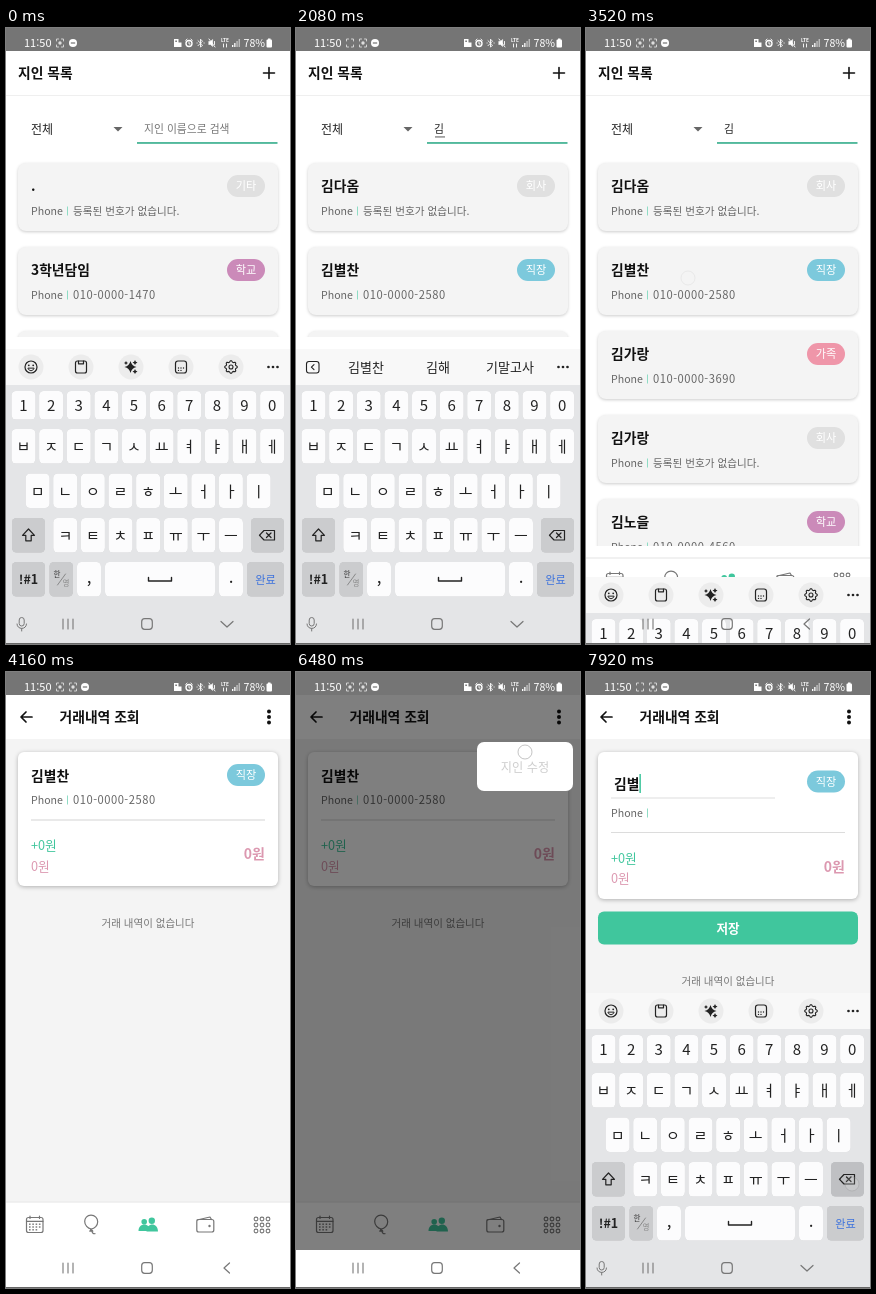
Write an HTML page that moves like this. It is 284 by 616 pixels and loops after 8 s.

```html
<!DOCTYPE html>
<html lang="ko">
<head>
<meta charset="utf-8">
<title>지인 목록</title>
<style>
  html, body { margin: 0; width: 100%; height: 100%; overflow: hidden; background: #fff; }
  svg { display: block; width: 100vw; height: 100vh; }
  text { font-family: "Noto Sans CJK KR", "Noto Sans", sans-serif; white-space: pre; }
  .card { filter: drop-shadow(0 1.5px 1.5px rgba(0, 0, 0, .2)); }
  .sheet { filter: drop-shadow(0 1px 2px rgba(0, 0, 0, .28)); }
  .key { filter: drop-shadow(0 .8px .3px rgba(0, 0, 0, .16)); }
</style>
</head>
<body>
<svg id="stage" viewBox="0 0 284 616" xmlns="http://www.w3.org/2000/svg"></svg>
<script>
const LOOP = 8000, STEP = 80, KB_HEIGHT = 295;
const GREEN = '#40c69d', PINK = '#dc98b0', GREY = '#e0e0e0';
const BLUE = '#7cc9dc', MAUVE = '#cb8ab9', ROSE = '#ef96a9';
const NO_PHONE = '등록된 번호가 없습니다.';
const FRIEND = { name: '김별찬', phone: '010-0000-2580', tag: '직장', color: BLUE };

const ALL = [
  { name: '.', phone: NO_PHONE, tag: '기타', color: GREY },
  { name: '3학년담임', phone: '010-0000-1470', tag: '학교', color: MAUVE },
  { name: '', phone: '', tag: '', color: '#f4f4f4' },
];
const FOUND = [
  { name: '김다옴', phone: NO_PHONE, tag: '회사', color: GREY },
  FRIEND,
  { name: '김가랑', phone: '010-0000-3690', tag: '가족', color: ROSE },
  { name: '김가랑', phone: NO_PHONE, tag: '회사', color: GREY },
  { name: '김노을', phone: '010-0000-4560', tag: '학교', color: MAUVE },
];

// Drawing helpers; text is placed by its vertical centre.
const group = (id, body, extra = '') => `<g id="${id}" ${extra}>${body}</g>`;
const rect = (x, y, w, h, fill, r = 0, extra = '') =>
  `<rect x="${x}" y="${y}" width="${w}" height="${h}" rx="${r}" fill="${fill}" ${extra}/>`;
const dot = (x, y, r, fill, extra = '') => `<circle cx="${x}" cy="${y}" r="${r}" fill="${fill}" ${extra}/>`;
const line = (d, color, w = 1.2, fill = 'none') =>
  `<path d="${d}" stroke="${color}" stroke-width="${w}" fill="${fill}" stroke-linecap="round" stroke-linejoin="round"/>`;
const label = (x, y, str, size, fill, extra = '') =>
  `<text x="${x}" y="${(y + size * .37).toFixed(2)}" font-size="${size}" fill="${fill}" ${extra}>${str}</text>`;
const MID = 'text-anchor="middle"', BOLD = 'font-weight="700"';

const chip = (y, tag, color) =>
  rect(221, y - 11, 38, 22, color, 11) + label(240, y, tag, 11.2, '#fff', MID);

function phoneRow(y, phone) {
  const number = phone.startsWith('0');
  return label(25, y, 'Phone', 10.6, '#666') + rect(61, y - 4.5, 1, 9, '#8fdcc5') +
    label(67, y, phone, number ? 11.2 : 10.6, '#666', number ? 'letter-spacing=".5"' : '');
}

function listCard(p, i) {
  const y = 135 + 84 * i;
  return rect(12, y, 260, 68, '#f4f4f4', 8, 'class="card"') +
    (p.name && label(25, y + 23, p.name, 13.8, '#111', BOLD) + chip(y + 23, p.tag, p.color) +
      phoneRow(y + 48, p.phone));
}

function statusBar() {
  const w = '#fff';
  const bracket = x => line(`M${x - 3.5} 13v-2h2M${x + 3.5} 13v-2h-2M${x - 3.5} 17v2h2M${x + 3.5} 17v2h-2`, '#ddd', .9);
  return rect(0, 0, 284, 23, '#757575') + label(18, 15, '11:50', 11, w) +
    bracket(54) + dot(54, 15, 1.7, '#ddd', 'id="blink"') +
    group('second', bracket(67) + dot(67, 15, 1.7, '#ddd')) +
    group('mute', dot(79, 15, 4, w) + rect(76.8, 14.4, 4.4, 1.2, '#757575')) +
    rect(168, 11, 4.5, 8, w) + rect(172, 14.5, 3.5, 4.5, w) + rect(169.3, 12.5, 1.6, 1.5, '#757575') +
    dot(183, 15.5, 3, 'none', 'stroke="#fff" stroke-width="1.4"') +
    line('M183 14v2h1.2M179.7 12.3l1.4-1.2M186.3 12.3l-1.4-1.2', w, .9) +
    line('M192 12.7l4.5 4.5-2 2v-8l2 2-4.5 4.5M191 15h.2M198 15h.2', w, .9) +
    line('M203 13.5h1.6l2-2v7l-2-2h-1.6z', w, .6, w) + line('M203 11l6 8M208.5 13.5v3', w, .9) +
    label(219, 12.6, 'LTE', 4.8, w, `${MID} ${BOLD}`) + line('M217.5 16v3M220.5 16v3', w, .9) +
    [0, 1, 2, 3].map(i => rect(226 + 2.2 * i, 17 - 2 * i, 1.3, 2 + 2 * i, i < 2 ? w : '#c4c4c4')).join('') +
    label(237.5, 15, '78%', 10.6, w) + rect(260.5, 11.5, 5.5, 8, w, 1) + rect(262, 10.5, 2.5, 2, w);
}

function tabBar() {
  const c = '#777';
  let s = rect(0, 529.5, 284, 49, '#fff') + rect(0, 529.5, 284, 1, '#e3e3e3');
  s += rect(20.5, 545.5, 16.5, 15, 'none', 2, `stroke="${c}" stroke-width="1.2"`) +
    line('M20.5 549.3h16.5M24 544v2.5M33.5 544v2.5', c);
  for (let i = 0; i < 11; i++) s += rect(23 + i % 4 * 3.3, 551.5 + Math.floor(i / 4) * 2.8, 1.6, 1.4, c);
  s += line('M85 543.2c-4 0-6.3 3-6.3 6.4c0 3.5 3 7 6.5 7.4c3.5-.4 6.5-3.6 6.5-7.3c0-3.5-2.7-6.5-6.7-6.5M85 557l-1.2 2.2h3zM86 559c0 2 1.5 3 3 2.7', c);
  s += dot(138.2, 549.7, 2.8, GREEN) + dot(145.8, 548.8, 3.2, GREEN) +
    `<path d="M132.5 559c0-8 10-8 10.5-3l-2 3zM140.5 559.5c0-9.5 11.5-9.5 11.5 0z" fill="${GREEN}"/>`;
  s += rect(190.8, 547.5, 17, 12.5, 'none', 2, `stroke="${c}" stroke-width="1.2"`) +
    line('M191 548l13-3 1.5 2.5', c) + dot(203.5, 554, 1.2, c);
  for (let i = 0; i < 9; i++)
    s += dot(250 + i % 3 * 6, 547 + Math.floor(i / 3) * 6, 1.9, 'none', `stroke="${c}" stroke-width="1.1"`);
  return s;
}

function keyboard() {
  const ink = '#222', dark = '#cbccce';
  const cap = (x, y, w, h, fill = '#fcfcfd', id = '') => rect(x, y, w, h, fill, 4.5, `class="key" ${id}`);
  const row = (keys, x0, y, h, size) => [...keys].map((k, i) => {
    const x = x0 + 27.62 * i;
    return cap((x - 12).toFixed(1), y, 24, h) + label(x.toFixed(1), y + h / 2 + .5, k, size, ink, MID);
  }).join('');
  let tools = [25, 75, 125, 175, 225].map(x => dot(x, 339, 12.5, '#ececec')).join('');
  tools += dot(25, 339, 6, 'none', `stroke="${ink}" stroke-width="1.2"`) + dot(22.8, 337.3, .9, ink) +
    dot(27.2, 337.3, .9, ink) + line('M22 340.5c1 3 5 3 6 0z', ink, 1);
  tools += rect(69.5, 333, 11, 12, 'none', 2, `stroke="${ink}" stroke-width="1.2"`) + line('M72.5 333v2.8h5v-2.8', ink);
  const star = (x, y, r) => `<path d="M${x} ${y - r}q${r * .2} ${r * .8} ${r} ${r}q${-r * .8} ${r * .2} ${-r} ${r}q${-r * .2} ${-r * .8} ${-r} ${-r}q${r * .8} ${-r * .2} ${r} ${-r}" fill="${ink}"/>`;
  tools += star(124.5, 339, 6) + star(129, 334.5, 2.5) + star(129, 343.5, 2.5) + star(120, 335, 2);
  tools += rect(169.5, 333, 11, 12, 'none', 2.5, `stroke="${ink}" stroke-width="1.2"`) +
    [[172.5, 340], [175, 340], [177.5, 340], [172.5, 342.4], [175, 342.4]].map(([x, y]) => dot(x, y, .7, ink)).join('');
  let gear = '';
  for (let i = 0; i < 32; i++) {
    const a = (i - .5) * Math.PI / 16, r = i % 4 < 2 ? 6.2 : 5;
    gear += (i ? 'L' : 'M') + (225 + r * Math.cos(a)).toFixed(1) + ' ' + (339 + r * Math.sin(a)).toFixed(1);
  }
  tools += line(gear + 'z', ink, 1.1) + dot(225, 339, 2, 'none', `stroke="${ink}" stroke-width="1.1"`);
  const hints = rect(10.5, 333.5, 12.5, 11.5, 'none', 2.5, `stroke="${ink}" stroke-width="1.1"`) +
    line('M18 336.7l-2.6 2.5 2.6 2.5', ink, 1.1) +
    [70, 142, 214].map((x, i) => label(x, 339.5, '', 13, ink, `${MID} id="hint${i}"`)).join('');

  return rect(0, 321, 284, 36, '#f8f8f8') + rect(0, 357, 284, 259, '#e4e5e7') +
    group('tools', tools) + group('hints', hints) + [262.5, 267, 271.5].map(x => dot(x, 339, 1.35, ink)).join('') +
    row('1234567890', 17.5, 363, 28.5, 15) + row('ㅂㅈㄷㄱㅅㅛㅕㅑㅐㅔ', 17.5, 401, 34.5, 15) +
    row('ㅁㄴㅇㄹㅎㅗㅓㅏㅣ', 31.6, 445.5, 34.5, 15) + row('ㅋㅌㅊㅍㅠㅜㅡ', 59.3, 490, 34.5, 15) +
    cap(6, 490, 33, 34.5, dark) + line('M22.5 501l-6 6.3h3.3v5.5h5.4v-5.5h3.3z', ink) +
    cap(245, 490, 33, 34.5, dark, 'id="erase"') +
    line('M258 502.5h10.5v9.5h-10.5l-4.5-4.75zM260.5 505l4.5 4.5M265 505l-4.5 4.5', ink) +
    cap(6, 534, 33, 34.5, dark) + label(22.5, 551.5, '!#1', 12.5, ink, `${MID} ${BOLD}`) +
    cap(43.5, 534, 23.5, 34.5, dark) + label(51, 546.5, '한', 7.5, '#333', MID) +
    label(60, 555.5, '영', 7.5, '#888', MID) + line('M51.5 557l8-11', '#777', .8) +
    cap(71, 534, 24, 34.5) + label(83, 549, ',', 17, ink, MID) +
    cap(99, 534, 110, 34.5) + line('M142.5 549.5v3.5h23v-3.5', ink, 1.4) +
    cap(213, 534, 24, 34.5) + label(225, 549, '.', 17, ink, MID) +
    cap(241, 534, 37, 34.5, dark) + label(259.5, 551.5, '완료', 11.2, '#3d72dc', MID);
}

function systemNav() {
  const c = '#777';
  return line('M57 591v10M62 591v10M67 591v10', c, 1.1) +
    rect(135.7, 590.7, 10.6, 10.6, 'none', 3, `stroke="${c}" stroke-width="1.2"`) +
    group('back', line('M223.5 591l-5.5 5 5.5 5', c)) +
    group('down', line('M215 593.5l6 5.5 6-5.5', c) + rect(13.2, 589.5, 5, 8.5, 'none', 2.5, `stroke="${c}"`) +
      line('M11 596c0 6 9.5 6 9.5 0M15.7 600.5v2.5', c, 1));
}

const listPage = rect(0, 23, 284, 555, '#fff') + rect(0, 67, 284, 1, '#efefef') +
  label(12, 45, '지인 목록', 13.8, '#111', BOLD) + line('M257.5 45h11M263 39.5v11', '#111', 1.6) +
  label(25, 101.6, '전체', 12, '#222') + `<path d="M107.5 99h9l-4.5 4.6z" fill="#666"/>` +
  label(138, 101, '', 10.8, '#777', 'id="query"') + rect(139, 108.5, 10, .9, '#444', 0, 'id="compose"') +
  rect(131, 114, 140.5, 1.9, '#52b99c') +
  `<g clip-path="url(#view)">${group('all', ALL.map(listCard).join(''))}${group('found', FOUND.map(listCard).join(''))}</g>`;

const detailPage = rect(0, 23, 284, 507, '#f4f4f4', 0, 'id="ground"') + rect(0, 23, 284, 44, '#fff') +
  line('M26 45H15.5M20 40l-5 5 5 5', '#111', 1.7) + label(53.5, 45, '거래내역 조회', 13.8, '#111', BOLD) +
  group('more', [39.5, 45, 50.5].map(y => dot(263, y, 2, '#111')).join('')) +
  rect(12, 80, 260, 134, '#fff', 6, 'class="sheet" id="sheet"') +
  group('profile', label(25, 104, FRIEND.name, 13.8, '#111', BOLD) + chip(103, FRIEND.tag, FRIEND.color) +
    phoneRow(128, FRIEND.phone) + rect(25, 147, 234, 2, '#e9e9e9')) +
  group('edit', label(28, 112, FRIEND.name, 13.8, '#111', `${BOLD} id="field"`) +
    rect(66, 102, 1.5, 19, GREEN, 0, 'id="caret"') + rect(25, 125.5, 164, 1, '#ddd') +
    chip(109.5, FRIEND.tag, FRIEND.color) + phoneRow(141, '') + rect(25, 160, 234, 1, '#dcdcdc') +
    rect(12, 239.5, 260, 33, GREEN, 6) + label(142, 256, '저장', 12.6, '#fff', `${MID} ${BOLD}`)) +
  group('sums', label(25, 173.5, '+0원', 12.7, GREEN) + label(25, 194, '0원', 12.7, PINK) +
    label(259, 182, '0원', 14, PINK, `text-anchor="end" ${BOLD}`)) +
  group('empty', label(142, 251, '거래 내역이 없습니다', 10.5, '#777', MID));

document.getElementById('stage').innerHTML =
  `<clipPath id="view"><rect id="window" x="0" y="125" width="284" height="184"/></clipPath>` +
  rect(0, 0, 284, 616, '#fff') + group('list', listPage) + group('detail', detailPage) + group('tabs', tabBar()) +
  group('menu', rect(0, 23, 284, 555, 'rgba(0,0,0,.5)') + rect(181, 70, 96, 49, '#fff', 7) +
    label(229, 95, '지인 수정', 12.2, '#222', `${MID} id="item"`)) +
  group('keys', keyboard()) + systemNav() + statusBar() + rect(0, 615, 284, 1, '#666') +
  dot(0, 0, 7, 'rgba(255,255,255,.25)', 'id="tap" stroke="#888" stroke-opacity=".55" stroke-width="1"');

const ui = {};
document.querySelectorAll('[id]').forEach(el => ui[el.id] = el);

// Timelines
const KB = [[0, 0], [3200, 0], [3280, 35], [3360, 95], [3440, 168], [3520, 228], [3600, 272], [3680, KB_HEIGHT],
  [7200, KB_HEIGHT], [7280, 250], [7360, 168], [7440, 92], [7520, 34], [7600, 6], [7680, 0], [LOOP, 0]];
const QUERY = [[0, '지인 이름으로 검색'], [1120, 'ㄱ'], [1440, '기'], [1760, '김']];
const HINTS = [[0, ['기말고사', '김해', FRIEND.name]], [1920, [FRIEND.name, '김해', '기말고사']]];
const TAPS = [[100, 420, 1040, 1200], [252, 465, 1360, 1520], [32, 465, 1680, 1840], [102, 250, 3040, 3200],
  [102, 250, 3440, 3600], [261, 38, 5440, 5600], [229, 80, 6320, 6560], [100, 112, 6960, 7120], [266, 512, 7760, LOOP]];

const ramp = (t, a, b) => Math.min(1, Math.max(0, (t - a) / (b - a)));
const within = (t, a, b) => t >= a && t < b;
const latest = (table, t) => table.filter(([at]) => at <= t).pop()[1];
const show = (el, on) => el.style.display = on ? '' : 'none';
const shift = (el, y) => el.setAttribute('transform', `translate(0 ${y})`);

function between(table, t) {
  const i = table.findIndex(([at]) => at > t);
  const [a, from] = table[i - 1], [b, to] = table[i];
  return from + (to - from) * (t - a) / (b - a);
}

function render(t) {
  const typed = within(t, 1120, 3200), editing = t >= 6560;
  const keysOpen = t < 3200 || t >= 7200;

  show(ui.blink, !within(t, 1840, 2320) && !within(t, 5840, 6080) && t < 7600);
  show(ui.second, t >= 80);
  ui.mute.setAttribute('transform', `translate(${t < 80 ? -12 : 0} 0)`);

  ui.query.textContent = latest(QUERY, t);
  ui.query.setAttribute('fill', t < 1120 ? '#777' : '#222');
  show(ui.compose, within(t, 1120, 3040));
  show(ui.all, t < 1920);
  show(ui.found, t >= 1920);
  ui.found.style.opacity = ramp(t, 1840, 2000);
  ui.window.setAttribute('height', keysOpen ? 184 : 393);

  const enter = 1 - (1 - ramp(t, 3680, 4160)) ** 2;
  show(ui.detail, enter > 0);
  ui.detail.style.opacity = enter;
  show(ui.list, enter < 1);
  ui.more.style.opacity = within(t, 5440, 5680) ? .3 : 1;
  show(ui.profile, !editing);
  show(ui.edit, editing);
  ui.sheet.setAttribute('height', editing ? 147 : 134);
  shift(ui.sums, editing ? 12.5 : 0);
  shift(ui.empty, editing ? 58 : 0);
  ui.ground.setAttribute('height', t >= 7200 ? 298 : 507);
  ui.field.textContent = t < 7840 ? FRIEND.name : FRIEND.name.slice(0, 2);
  ui.caret.setAttribute('x', t < 7840 ? 66 : 53.4);
  show(ui.caret, t >= 6960);

  show(ui.tabs, t < 7200);
  show(ui.menu, within(t, 5600, 6560));
  ui.menu.style.opacity = ramp(t, 5520, 5840);
  ui.item.style.opacity = 1 - .78 * ramp(t, 6240, 6400);

  const drop = between(KB, t);
  show(ui.keys, drop < KB_HEIGHT);
  shift(ui.keys, drop);
  show(ui.tools, !typed);
  show(ui.hints, typed);
  latest(HINTS, t).forEach((word, i) => ui['hint' + i].textContent = word);
  ui.erase.setAttribute('fill', t >= 7760 ? '#bfc0c3' : '#cbccce');
  show(ui.back, !keysOpen);
  show(ui.down, keysOpen);

  const tap = TAPS.find(([, , a, b]) => within(t, a, b));
  show(ui.tap, tap);
  if (tap) {
    ui.tap.setAttribute('cx', tap[0]);
    ui.tap.setAttribute('cy', tap[1]);
    ui.tap.style.opacity = tap[1] === 250 ? .2 : tap[1] === 512 ? .5 : .9;
  }
}

const start = performance.now();
function tick() {
  const t = (performance.now() - start) % LOOP;
  render(Math.floor(t / STEP) * STEP);
  requestAnimationFrame(tick);
}
tick();
</script>
</body>
</html>
```
